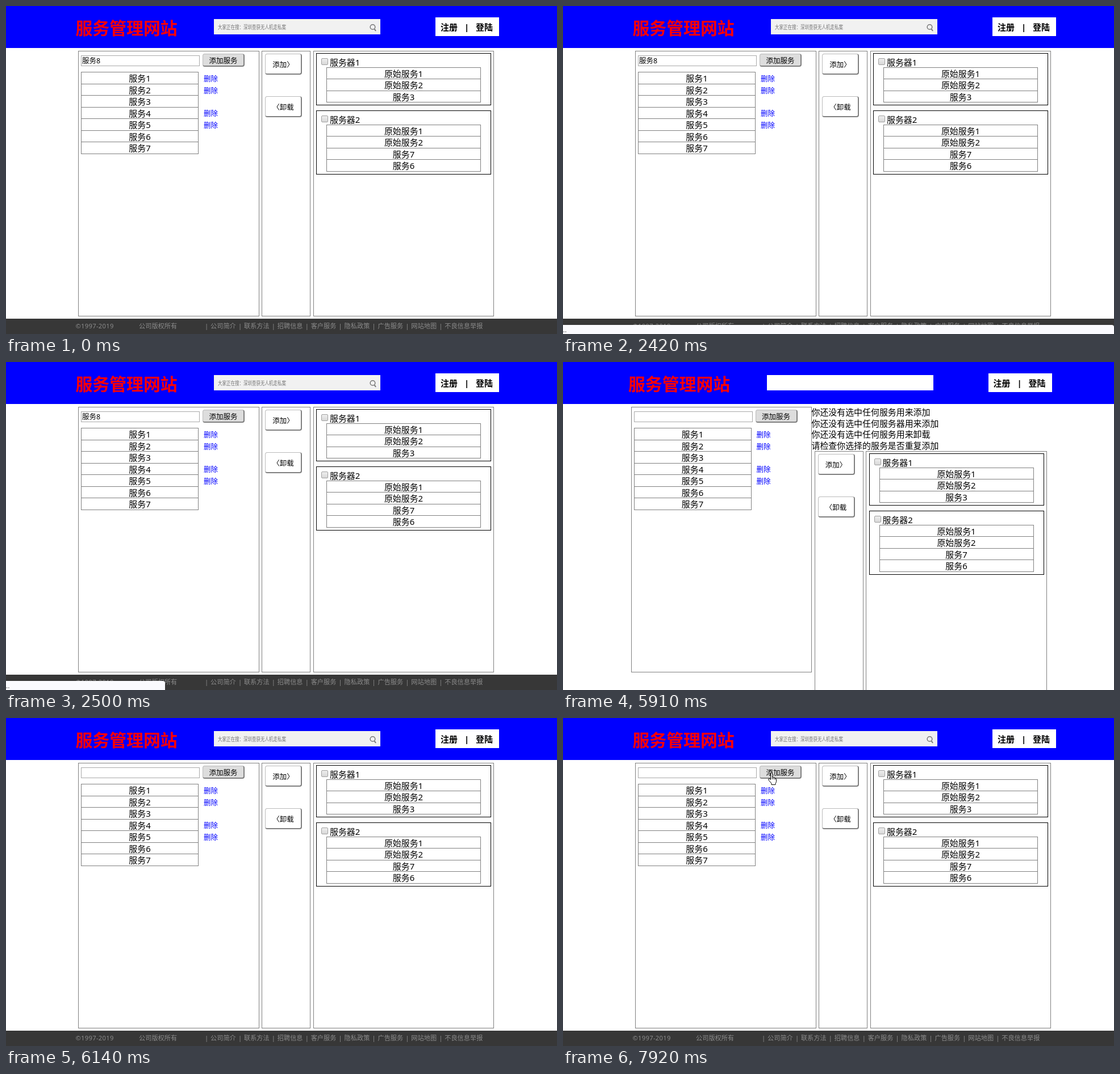
An HTML page for the animation above (8000 ms loop, 970 by 578 pixels).

```html
<!DOCTYPE html>
<html lang="zh-CN">
<head>
<meta charset="utf-8">
<title>服务管理网站</title>
<style>
* { box-sizing: border-box; }
html, body { margin: 0; width: 100%; height: 100%; overflow: hidden; background: #fff; }
.stage {
  position: relative; width: 970px; height: 578px; overflow: hidden;
  font: 14.93px/20px "Noto Sans", "Noto Sans CJK SC", "Noto Sans CJK", sans-serif;
  color: #000; white-space: nowrap;
  --dx: 0px; --dy: 0px; --normal: visible; --alert: hidden; --search: #f1f1f1;
  animation: layout 8s step-end infinite;
}
.stage div, .stage svg, .page > span, .lower span { position: absolute; }
.top { left: 0; top: 0; width: 970px; height: 73.5px; background: #00f; }
.page { left: var(--dx); top: 0; width: 970px; height: 578px; }
.lower { left: 0; top: var(--dy); }

.title { left: 122.5px; top: 19px; font-size: 29.87px; line-height: 40px; font-weight: 700; color: #f00; }
.search { left: 366px; top: 23px; width: 293px; height: 27px; background: var(--search); }
.search * { visibility: var(--normal); }
.search div { left: 7px; top: 4px; font-size: 10px; color: #777; transform: scaleX(.75); transform-origin: 0 0; }
.search svg { left: 273px; top: 6px; }
.login { left: 756px; top: 20px; width: 112px; height: 33px; background: #fff; font-weight: 700; }
.login span { position: absolute; top: 7px; }

.col { top: 79px; height: 467.5px; border: 1px solid #808080; }
.input { left: 132px; top: 87px; width: 209px; height: 19px; border: 1px solid #a9a9a9; padding-left: 1px; font-size: 12.44px; line-height: 18px; }
.input span { animation: typed 8s step-end infinite; }
.btn {
  width: 65px; height: 37px; background: #fff; border: 1px solid #bbb; border-width: 1px 2px 2px 1px;
  border-right-color: #808080; border-bottom-color: #808080; border-radius: 4px;
  font-size: 12.44px; line-height: 37px; text-align: center;
}
.btn.grey { left: 346px; top: 84px; width: 74px; height: 23px; background: #ddd; line-height: 23px; }
.list { width: 207px; border: 1px solid #808080; border-top: 0; text-align: center; }
.list p { margin: 0 -1px; height: 20.5px; line-height: 20.5px; border: 1px solid #808080; border-bottom: 0; }
.del { left: 348px; font-size: 12.44px; color: #00f; }
.server { left: 546px; width: 308px; border: 1px solid #000; }
.server .list { left: 17px; top: 23.5px; width: 272px; }
.server i { position: absolute; left: 8px; top: 8px; width: 12px; height: 12px; border: 1px solid #a0a0a0; border-radius: 2px; background: linear-gradient(#eee, #d8d8d8); }
.server span { left: 23px; top: 5px; }
.alert { left: 445px; top: 79px; line-height: 19.5px; visibility: var(--alert); }

.footer { left: 0; top: 551px; width: 970px; height: 27px; background: #373737; color: #8b8b8b; font-size: 11.2px; line-height: 26px; visibility: var(--normal); }
.footer span { position: absolute; }
.menu { left: 360px; top: 0; display: flex; }
.menu a { position: relative; width: 58.9px; }
.menu a::before { content: "|"; position: absolute; left: -10px; }

.status {
  left: 0; top: 562px; width: 280px; height: 20px; background: #fafafe; border-radius: 0 4px 0 0;
  font-size: 12px; line-height: 18px; color: #555; box-shadow: 0 0 1px #222; opacity: 0;
  animation: status 8s step-end infinite;
}
.cursor { left: 0; top: 0; visibility: hidden; animation: move 8s step-end infinite; }
.cursor svg { left: 0; top: 0; fill: #fff; stroke: #000; stroke-linejoin: round; overflow: visible; visibility: hidden; }
.cursor .arrow { animation: arrow 8s step-end infinite; }
.cursor .beam { animation: beam 8s step-end infinite; }
.cursor .hand { animation: hand 8s step-end infinite; }

@keyframes layout {
  73.875% { --dx: -7.5px; --dy: 78px; --normal: hidden; --alert: visible; --search: #fff; }
  76.75%, 100% { --dx: 0px; --dy: 0px; --normal: visible; --alert: hidden; --search: #f1f1f1; }
}
@keyframes typed { 0% { visibility: visible; } 73.875%, 100% { visibility: hidden; } }
@keyframes status {
  0% { opacity: 0; width: 280px; }
  6.25% { opacity: 1; width: 280px; }
  30.25% { opacity: 1; width: 970px; }
  31.25% { opacity: 1; width: 280px; }
  73% { opacity: .5; width: 280px; }
  73.875%, 100% { opacity: 0; width: 280px; }
}
@keyframes move {
  0%, 83.625% { transform: translate(239px, 341px); }
  85.5% { transform: translate(239px, 341px); animation-timing-function: steps(4, start); }
  89.0417% { transform: translate(215px, 215px); animation-timing-function: steps(4, start); }
  92.5833% { transform: translate(275px, 84px); animation-timing-function: steps(4, start); }
  96.12% { transform: translate(342px, 90px); }
  96.125% { transform: translate(350px, 95px); animation-timing-function: steps(3, end); }
  99%, 100% { transform: translate(361px, 96px); }
}
@keyframes arrow { 0% { visibility: hidden; } 83.625% { visibility: visible; } 92.5833%, 100% { visibility: hidden; } }
@keyframes beam { 0% { visibility: hidden; } 92.5833% { visibility: visible; } 96.125%, 100% { visibility: hidden; } }
@keyframes hand { 0% { visibility: hidden; } 96.125%, 100% { visibility: visible; } }
</style>
</head>
<body>
<div class="stage">
  <div class="top"></div>
  <div class="page">
    <div class="title">服务管理网站</div>
    <div class="search">
      <div>大家正在搜：深圳查获无人机走私案</div>
      <svg width="14" height="18" fill="none" stroke="#777" stroke-width="1.5"><circle cx="6.5" cy="8" r="4.3"/><path d="M9.5 11.5l2.6 3.5" stroke-width="2"/></svg>
    </div>
    <div class="login"><span style="left:9px">注册</span><span style="left:51px">|</span><span style="left:71px">登陆</span></div>

    <div class="col" style="left:127px;width:318.5px"></div>
    <div class="input"><span>服务8</span></div>
    <div class="btn grey">添加服务</div>
    <div class="list" style="left:132px;top:116px"><p>服务1<p>服务2<p>服务3<p>服务4<p>服务5<p>服务6<p>服务7</div>
    <span class="del" style="top:119px">删除</span>
    <span class="del" style="top:139.5px">删除</span>
    <span class="del" style="top:180px">删除</span>
    <span class="del" style="top:200.5px">删除</span>

    <div class="alert">你还没有选中任何服务用来添加<br>你还没有选中任何服务器用来添加<br>你还没有选中任何服务用来卸载<br>请检查你选择的服务是否重复添加</div>

    <div class="lower">
      <div class="col" style="left:450px;width:86px"></div>
      <div class="btn" style="left:456px;top:84px">添加〉</div>
      <div class="btn" style="left:456px;top:159px">〈卸载</div>
      <div class="col" style="left:540.5px;width:318.5px"></div>
      <div class="server" style="top:83px;height:92px">
        <i></i><span>服务器1</span>
        <div class="list"><p>原始服务1<p>原始服务2<p>服务3</div>
      </div>
      <div class="server" style="top:184px;height:112.5px">
        <i></i><span>服务器2</span>
        <div class="list"><p>原始服务1<p>原始服务2<p>服务7<p>服务6</div>
      </div>
    </div>

    <div class="footer">
      <span style="left:122.5px;letter-spacing:.3px">©1997-2019</span>
      <span style="left:234px">公司版权所有</span>
      <div class="menu"><a>公司简介</a><a>联系方法</a><a>招聘信息</a><a>客户服务</a><a>隐私政策</a><a>广告服务</a><a>网站地图</a><a>不良信息举报</a></div>
    </div>
  </div>

  <div class="status">..</div>
  <div class="cursor">
    <svg class="arrow" width="12" height="18"><path d="M.5.5v14.5l3.4-3.2 2.3 5.4 2.3-1-2.3-5.2h4.8z"/></svg>
    <svg class="beam" width="7" height="16"><path fill="none" d="M0 .5h2.5l1 1 1-1H7M3.5 1.5v13M0 15.5h2.5l1-1 1 1H7"/></svg>
    <svg class="hand" width="15" height="22"><path d="M4.5 12.5V2q0-1.5 1.4-1.5T7.3 2v6q2.5-.8 2.7 1 2.2-.6 2.4 1.2 2.1-.3 2.1 1.5v4q0 2-1.5 3.5v2.3H6v-2.3L1 13.5q-1-1.8.4-2.5 1.3-.4 3.1 1.5zM7.3 8v4M10 9v3M12.4 10.2v2.3"/></svg>
  </div>
</div>
</body>
</html>
```
